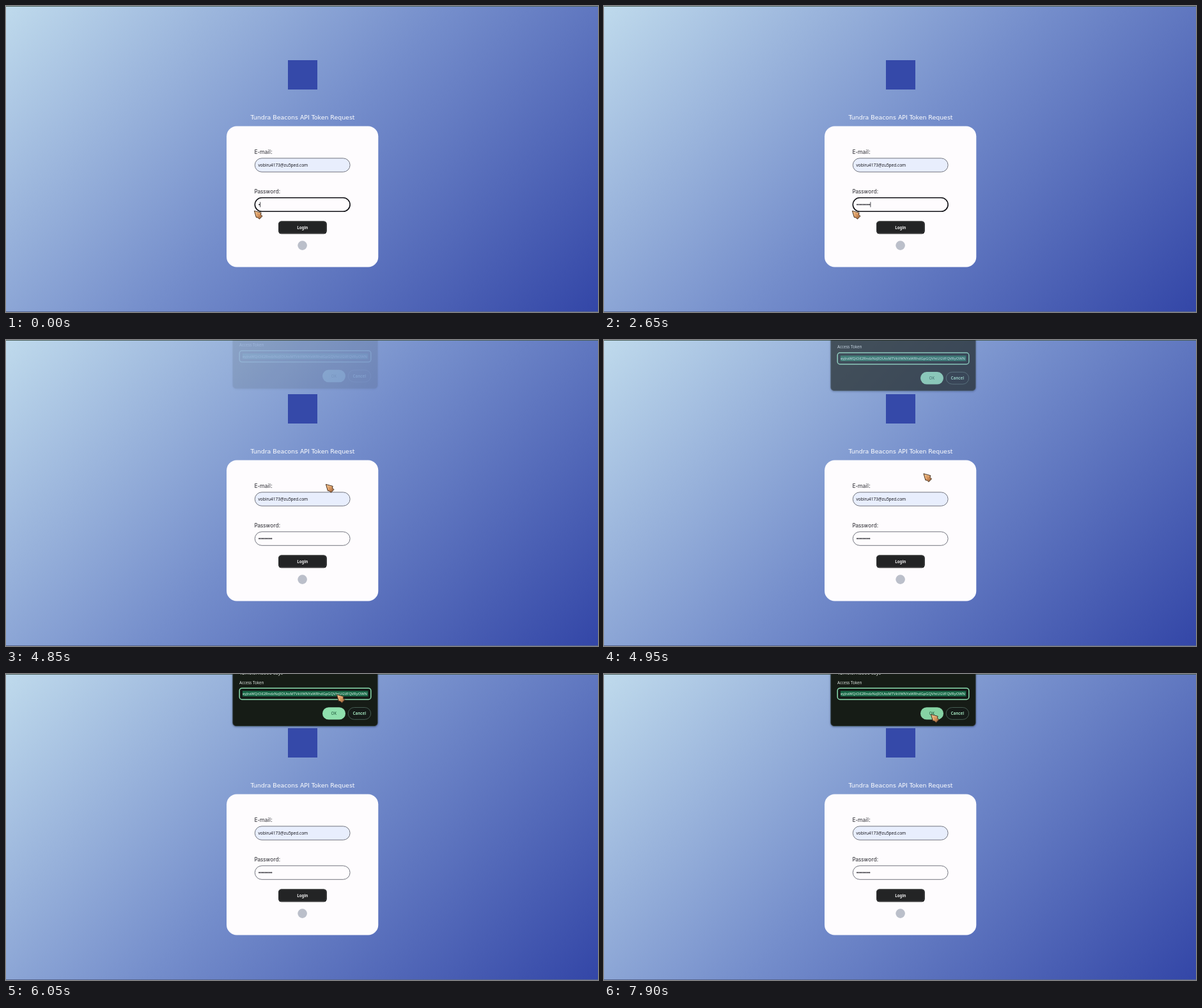
These frames come from a looping animation (926x480 px, 7950 ms). An HTML page:

```html
<!DOCTYPE html>
<html lang="en">
<head>
<meta charset="utf-8">
<title>Token request</title>
<style>
  html, body { margin: 0; width: 100%; height: 100%; overflow: hidden; }
  svg { display: block; width: 100vw; height: 100vh; }
  text { white-space: pre; }
  .page { font-family: "DejaVu Sans", sans-serif; }
  .ui { font-family: "Noto Sans", sans-serif; }
  .mid { text-anchor: middle; }
</style>
</head>
<body>
<svg viewBox="0 0 926 480" xmlns="http://www.w3.org/2000/svg">
  <defs>
    <linearGradient id="sky" gradientUnits="userSpaceOnUse" x1="111.5" y1="-111.5" x2="814.5" y2="591.5">
      <stop offset="0" stop-color="#bfdaec"/>
      <stop offset=".5" stop-color="#748dcb"/>
      <stop offset="1" stop-color="#3346a7"/>
    </linearGradient>
    <linearGradient id="wood" x1="0" y1="0" x2="1" y2="1">
      <stop offset="0" stop-color="#efb57c"/>
      <stop offset=".55" stop-color="#d5935c"/>
      <stop offset="1" stop-color="#7d5034"/>
    </linearGradient>
    <filter id="shade" x="-10%" y="-10%" width="120%" height="130%">
      <feDropShadow dx="0" dy="1" stdDeviation="1.5" flood-color="#101a30" flood-opacity=".45"/>
    </filter>
    <clipPath id="field"><rect x="369.5" y="24" width="197" height="15"/></clipPath>
  </defs>

  <rect width="926" height="480" fill="url(#sky)"/>
  <rect width="926" height="1" fill="#4b6058"/>
  <rect y="479" width="926" height="1" fill="#56658f"/>

  <rect x="441" y="85" width="46" height="46" fill="#3549a9"/>
  <text class="page mid" x="464" y="177.5" font-size="9.4" fill="#fff">Tundra Beacons API Token Request</text>

  <rect x="345" y="188.5" width="237.3" height="221" rx="16" fill="#fefcfe"/>
  <g class="page" font-size="8.15" fill="#26262c">
    <text x="388.6" y="231.8">E-mail:</text>
    <text x="388.6" y="293.8">Password:</text>
  </g>
  <rect x="389.3" y="238.8" width="148.8" height="21.5" rx="10.75" fill="#e8eefd" stroke="#73757e"/>
  <text class="ui" x="394.5" y="252" font-size="6.5" fill="#15151c">vobiru4173@zu5ped.com</text>
  <rect id="pass" x="389.3" y="300.8" width="148.8" height="21.5" rx="10.75" fill="#fefcfe"/>
  <g id="dots" fill="#15151c"></g>
  <rect id="caret" y="307.5" width=".8" height="8" fill="#15151c"/>

  <rect x="426" y="337.4" width="75.8" height="20.2" rx="5" fill="#060607"/>
  <rect x="426.4" y="337.8" width="74.6" height="18.6" rx="4.6" fill="#232425" stroke="#555658" stroke-width=".7"/>
  <text class="ui mid" x="463.8" y="350.2" font-size="6.2" font-weight="600" fill="#f2f2f2">Login</text>
  <circle cx="463.6" cy="375.6" r="7.3" fill="#bbbfca"/>

  <g id="dialog" class="ui">
    <rect x="354.8" y="-20" width="226.4" height="101.5" rx="5" fill="#151b18" stroke="#333e3b" stroke-width=".8" filter="url(#shade)"/>
    <text x="365" y=".6" font-size="7.5" font-weight="500" fill="#e3ebe6">127.0.0.1:5500 says</text>
    <text x="365" y="15.6" font-size="6.2" fill="#dfe7e2">Access Token</text>
    <rect x="365.2" y="22.2" width="205.6" height="17.8" rx="4" fill="#141a17" stroke="#8bdcae" stroke-width="1.5"/>
    <rect x="370" y="26.6" width="196.3" height="8.6" fill="#1a6a49"/>
    <text x="370" y="33.2" font-size="5.82" fill="#e4f3ea" clip-path="url(#field)">eyJraWQiOiI2RndzNzJIOUtoMTVkVWNYaWRhdGpGQVhtUGVFQVRyOWN</text>
    <rect id="ok" x="495" y="52.2" width="36" height="19.4" rx="9.7"/>
    <text class="mid" x="512.8" y="64.2" font-size="6.2" fill="#1d5539">OK</text>
    <rect id="cancel" x="535.2" y="52.5" width="35.4" height="18.8" rx="9.4" stroke="#4c6458" stroke-width=".9"/>
    <text class="mid" x="552.8" y="64.2" font-size="6.2" font-weight="600" fill="#a0e0ba">Cancel</text>
  </g>

  <g id="cursor">
    <path d="M.4 .4 L11.2 3.4 L10.4 6 L12.9 8.6 L8.4 13.3 L5.9 10.8 L3.4 10.6Z" fill="url(#wood)" stroke="#46301f" stroke-width="1" stroke-linejoin="round"/>
    <path d="M2 2 L9.4 4.2 M2.6 3 L4.4 8.6" fill="none" stroke="#f8d0a0" stroke-width=".7"/>
  </g>
</svg>
<script>
const LOOP = 7950, STEP = 50, GAP = 2.4;
const CLICK = 4300, OPEN = 4800;
const keys = [0, 250, 500, 750, 1000, 1300, 1900, 2200, 2550];

// time, x, y of the pointer tip
const path = [
  [0, 388, 321], [3050, 388, 321], [3600, 397, 339], [4000, 452, 346], [4250, 460, 346],
  [4450, 460, 346], [4850, 500, 226], [5250, 497, 119], [5650, 515, 36], [5950, 515, 36],
  [6050, 517, 32], [6350, 519, 45], [6700, 556, 56], [7000, 553, 67], [7450, 512, 63], [7950, 511, 63]
];

const $ = id => document.getElementById(id);
const set = (el, attrs) => { for (const k in attrs) el.setAttribute(k, attrs[k]); };
const clamp = v => Math.min(1, Math.max(0, v));
const smooth = v => v * v * (3 - 2 * v);

const dots = keys.map((_, i) => {
  const dot = document.createElementNS("http://www.w3.org/2000/svg", "circle");
  set(dot, { cx: 396.1 + GAP * i, cy: 311.6, r: 1 });
  return $("dots").appendChild(dot);
});

function pointer(t) {
  const i = path.findIndex(p => p[0] > t);
  const [t0, x0, y0] = path[i - 1], [t1, x1, y1] = path[i];
  const k = smooth((t - t0) / (t1 - t0));
  return [x0 + (x1 - x0) * k, y0 + (y1 - y0) * k];
}

function draw(t) {
  const typed = keys.filter(k => k <= t).length;
  const focus = t < CLICK;
  const blink = (t - keys[typed - 1]) % 1000 < 500;
  dots.forEach((dot, i) => set(dot, { visibility: i < typed ? "visible" : "hidden" }));
  set($("caret"), { x: 394.9 + GAP * typed, visibility: focus && blink ? "visible" : "hidden" });
  set($("pass"), { stroke: focus ? "#111116" : "#73757e", "stroke-width": focus ? 1.6 : 1 });

  const shown = smooth(clamp((t - OPEN) / 250));
  set($("dialog"), { opacity: shown, transform: `translate(0 ${-6 * (1 - shown)})` });

  const [x, y] = pointer(t);
  const over = (left, right) => y > 52 && y < 72 && x > left && x < right;
  set($("ok"), { fill: over(495, 531) ? "#86d3a4" : "#8fdfad" });
  set($("cancel"), { fill: over(535, 571) ? "#222c27" : "#151b18" });
  set($("cursor"), { transform: `translate(${x} ${y})` });
}

const start = performance.now();
function tick() {
  const t = Math.max(0, performance.now() - start) % LOOP;
  draw(Math.floor(t / STEP) * STEP);
  requestAnimationFrame(tick);
}
tick();
</script>
</body>
</html>
```
